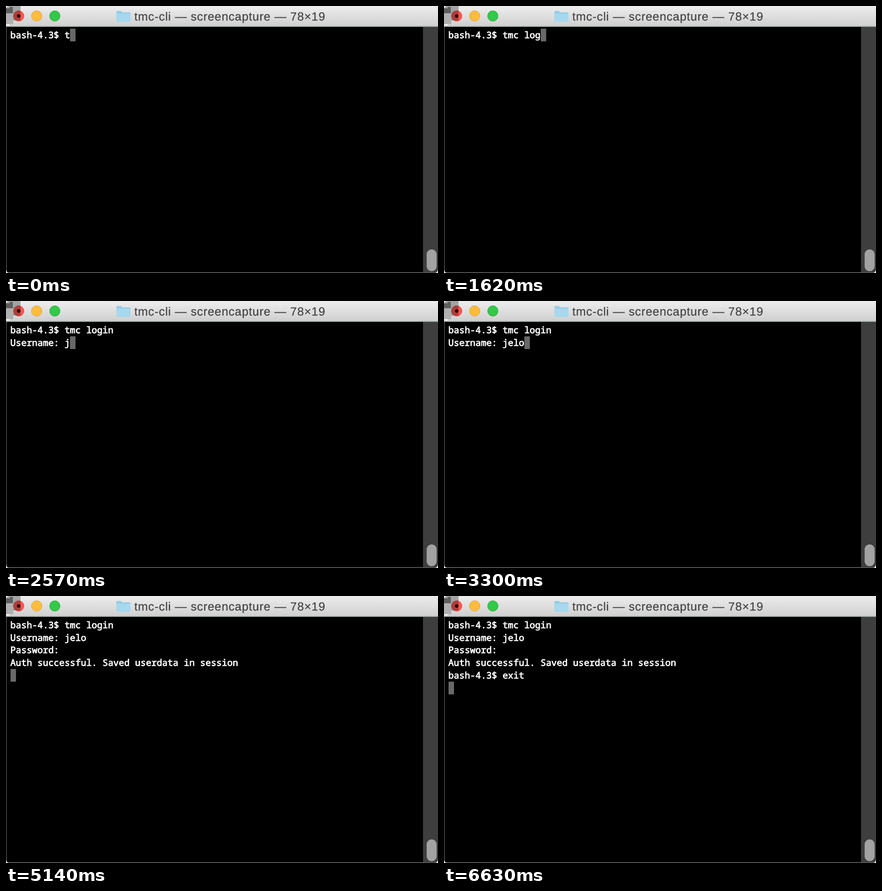
An HTML page for the animation above (9290 ms loop, 951x589 px).

```html
<!DOCTYPE html>
<html lang="en">
<head>
<meta charset="utf-8">
<title>Terminal login</title>
<style>
  html, body { margin: 0; width: 100%; height: 100%; overflow: hidden; background: #fff; }
  svg { display: block; width: 951px; height: 589px; }
  text { text-rendering: geometricPrecision; white-space: pre; }
  #title {
    font: 26px "Liberation Sans", Arial, sans-serif; letter-spacing: .87px;
    fill: #444; stroke: #444; stroke-width: .3px;
  }
  #lines text {
    font: 19.9px "Noto Sans Mono", "DejaVu Sans Mono", monospace;
    fill: #fff; stroke: #fff; stroke-width: .9px;
  }
</style>
</head>
<body>
<svg viewBox="0 0 951 589">
  <defs>
    <linearGradient id="bar" x2="0" y2="1">
      <stop offset="0" stop-color="#ededed"/>
      <stop offset="1" stop-color="#d0d0d0"/>
    </linearGradient>
    <clipPath id="frame"><rect width="951" height="589" rx="8"/></clipPath>
  </defs>
  <g clip-path="url(#frame)">
    <rect width="951" height="589" fill="#3e3e3e"/>
    <rect x="2" y="46" width="916" height="541" fill="#000"/>
    <rect y="587" width="951" height="2" fill="#555"/>
    <rect x="926" y="537" width="22" height="48" rx="11" fill="#a2a2a2"/>
    <rect width="951" height="44" fill="url(#bar)"/>
    <rect y="44" width="951" height="2" fill="#a3aea6"/>

    <g stroke-width="1">
      <circle cx="28" cy="22" r="11.5" fill="#fc5753" stroke="#df4744"/>
      <circle cx="67.5" cy="22" r="11.5" fill="#fdbc40" stroke="#de9f34"/>
      <circle cx="107.5" cy="22" r="11.5" fill="#34c84a" stroke="#27aa35"/>
    </g>
    <circle cx="28" cy="22" r="4" fill="#4a0c0a"/>
    <path d="M0 0H32V32H16V16H0Z" fill="#000" opacity=".3"/>
    <rect y="16" width="16" height="24" fill="#b0b0b0"/>
    <path d="M0 5H8V2H15V16H0Z" fill="#5f5f5f"/>
    <rect y="40" width="8" height="3" fill="#f4f4f4"/>

    <g id="heading">
      <path d="M243 13q0-2 2-2h8l3 3h16q2 0 2 2v17q0 2-2 2h-27q-2 0-2-2z" fill="#98cde6"/>
      <path d="M243 17h31v16q0 2-2 2h-27q-2 0-2-2z" fill="#a6d8ee"/>
      <text id="title" x="282.5" y="32"></text>
    </g>
  </g>
  <rect id="cursor" width="12" height="28" fill="#686868"/>
  <g id="lines"></g>
</svg>
<script>
  const LOOP = 9290, LEFT = 9.6, TOP = 50.2, CHAR = 11.94, ROW = 27.8, ROWS = 6;
  const PROMPT = "bash-4.3$ ", USER = "jelo";
  const $ = id => document.getElementById(id);

  // Each step appends output to the screen at its time.
  const steps = [
    [0, PROMPT + "t"], [720, "m"], [810, "c"], [1150, " "],
    [1350, "l"], [1470, "o"], [1620, "g"], [1660, "i"], [2080, "n"],
    [2220, "\n"], [2550, "Username: "], [2570, USER[0]],
    [3130, USER[1]], [3210, USER[2]], [3290, USER[3]], [3350, "\n"],
    [3570, "Password: "], [3670, "\n"],
    [5140, "Auth successful. Saved userdata in session\n"],
    [6530, PROMPT], [6630, "exit\n"]
  ];
  // Spans in which the title bar names the other process.
  const busy = [[1350, 1470], [1660, 2220], [3350, 3570]];

  const rows = Array.from({ length: ROWS }, (_, i) => {
    const row = document.createElementNS("http://www.w3.org/2000/svg", "text");
    row.setAttribute("x", LEFT);
    row.setAttribute("y", TOP + 20.6 + i * ROW);
    return $("lines").appendChild(row);
  });

  let shown = "";
  function draw(t) {
    const screen = steps.filter(s => s[0] <= t).map(s => s[1]).join("");
    const other = busy.some(([from, to]) => t >= from && t < to);
    if (shown === screen + other) return;
    shown = screen + other;

    const lines = screen.split("\n");
    rows.forEach((row, i) => row.textContent = lines[i] || "");
    const last = lines.length - 1;
    $("cursor").setAttribute("x", Math.round(LEFT + lines[last].length * CHAR));
    $("cursor").setAttribute("y", Math.floor(TOP + last * ROW));
    $("title").textContent = `tmc-cli — ${other ? "ttygif" : "screencapture"} — 78×19`;
    $("heading").setAttribute("transform", `translate(${other ? 58 : 0} 0)`);
  }

  const start = performance.now();
  function tick() {
    draw((performance.now() - start) % LOOP);
    requestAnimationFrame(tick);
  }
  tick();
</script>
</body>
</html>
```
